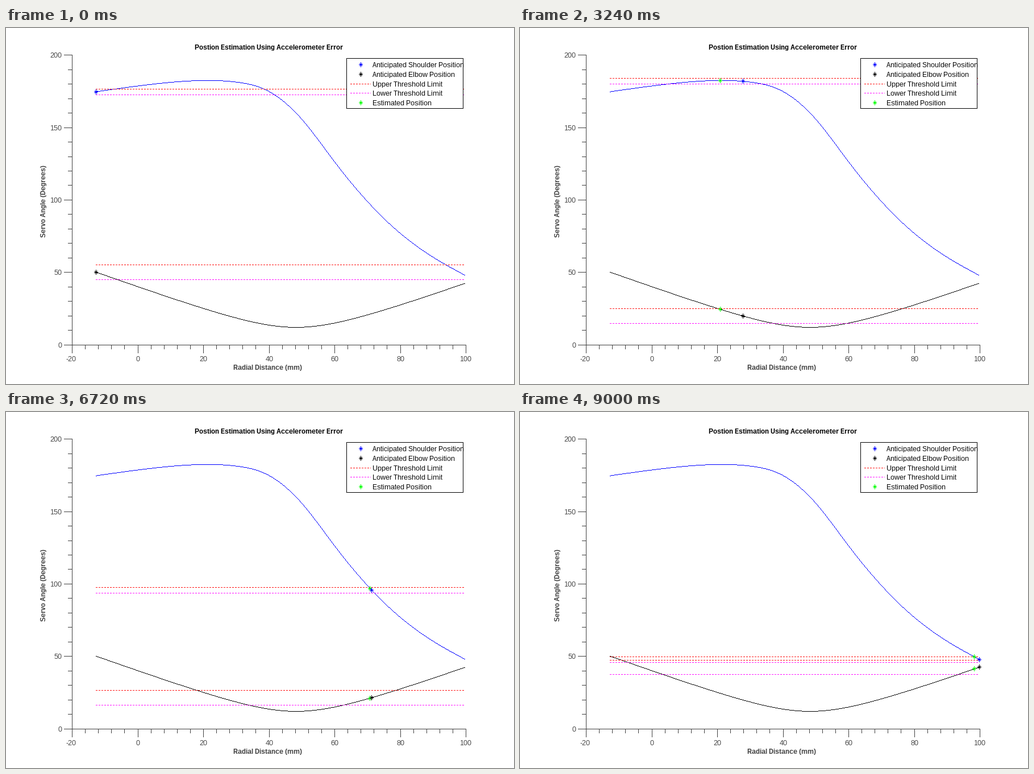
These frames come from a looping animation (894 px wide and 626 px high, 9.04 s). A matplotlib script:

```python
import matplotlib.pyplot as plt
import numpy as np
from matplotlib.animation import FuncAnimation
from matplotlib.patches import Rectangle

W, H, DPI = 894, 626, 100
PX = 72 / DPI
FRAMES, STEP_MS = 226, 40
SHOULDER_TOL, ELBOW_TOL = 2, 5
BLUE, BLACK, RED, PINK, GREEN = "#0000ff", "#000000", "#ff0000", "#ff00ff", "#00ff00"
AXIS = "#404040"

plt.rcParams.update({
    "font.family": "Liberation Sans", "font.size": 12 * PX,
    "text.hinting": "default", "text.hinting_factor": 1,
    "lines.scale_dashes": False, "path.simplify": False,
})


def spline(knots, x):
    """Natural cubic spline through the (x, y) knots."""
    kx, ky = np.array(knots, float).T
    n, h = len(kx), np.diff(kx)
    slope = np.diff(ky) / h
    a, b = np.eye(n), np.zeros(n)
    for i in range(1, n - 1):
        a[i, i - 1:i + 2] = h[i - 1], 2 * (h[i - 1] + h[i]), h[i]
        b[i] = 6 * (slope[i] - slope[i - 1])
    m = np.linalg.solve(a, b)
    k = np.clip(np.searchsorted(kx, x) - 1, 0, n - 2)
    t, u, d = x - kx[k], kx[k + 1] - x, h[k]
    return ((m[k] * u**3 + m[k + 1] * t**3) / (6 * d)
            + (ky[k] / d - m[k] * d / 6) * u
            + (ky[k + 1] / d - m[k + 1] * d / 6) * t)


def to_x(mm):
    return 116.5 + 5.775 * (mm + 20)


def to_y(deg):
    return 557.2 - 2.5475 * deg


radius = -12.7 + 0.5 * np.arange(FRAMES)
shoulder = spline([(-12.7, 174.7), (10, 181.2), (30, 181.4), (40, 174.9),
                   (50, 155.6), (60, 126.2), (75, 87.2), (88, 63.4),
                   (99.8, 47.9)], radius)
offset = radius - 48.2
elbow = 12.1 + np.hypot(14.4, 0.826 * offset) - 14.4 - 0.003 * offset

fig = plt.figure(figsize=(W / DPI, H / DPI), dpi=DPI, facecolor="white")
ax = fig.add_axes([0, 0, 1, 1])
ax.set_xlim(0, W)
ax.set_ylim(H, 0)
ax.axis("off")


def line(xs, ys, color, z=2, **kw):
    """Crisp one-pixel line; points belong on pixel centres."""
    return ax.plot(xs, ys, color=color, lw=0.5 * PX, antialiased=False,
                   snap=False, solid_capstyle="butt", dash_capstyle="butt",
                   zorder=z, **kw)[0]


def text(x, y, s, color=BLACK, **kw):
    kw.setdefault("va", "baseline")
    ax.text(x, y, s, color=color, zorder=12, **kw)


def pixels(x, y):
    """Path data that fills the single pixel under each point."""
    x, y = np.floor(x), np.floor(y) + 0.5
    gap = np.full(len(x), np.nan)
    return (np.column_stack([x + 0.1, x + 0.9, gap]).ravel(),
            np.column_stack([y, y, gap]).ravel())


def curve_pixels(x, y):
    """One pixel per step along the longer axis of travel."""
    step = np.maximum(abs(np.diff(x)), abs(np.diff(y)))
    dist = np.concatenate([[0], np.cumsum(step)])
    at = np.arange(0, dist[-1])
    return pixels(np.interp(at, dist, x), np.interp(at, dist, y))


def star_pixels(x, y):
    dx, dy = np.meshgrid(np.arange(-3, 4), np.arange(-4, 5))
    arms = (dx * dy == 0) | ((abs(dx) == abs(dy)) & (abs(dx) < 3))
    return pixels(np.floor(x) + dx[arms], np.floor(y) + dy[arms])


def star(color, z, x=0, y=0):
    return line(*star_pixels(x, y), color, z)


def dashed(color, z=3, x0=158, x1=806):
    return line([x0 + 0.1, x1], [0, 0], color, z,
                linestyle=(0, (2.8 * PX, 2.2 * PX)))


def level(ln, y):
    ln.set_ydata([np.floor(y) + 0.5] * 2)


# Axes and ticks
line([116.5, 116.5], [47, 558], AXIS)
line([116, 810], [557.5, 557.5], AXIS)
for deg in range(0, 201, 10):
    y = np.floor(to_y(deg)) + 0.5
    major = deg % 50 == 0
    line([102 if major else 109, 116], [y, y], AXIS)
    if major:
        text(98.5, y + 4.5, str(deg), AXIS, ha="right")
for mm in range(-20, 101, 4):
    x = np.floor(to_x(mm)) + 0.5
    major = mm % 20 == 0
    line([x, x], [558, 572 if major else 565], AXIS)
    if major:
        text(x - (2 if mm < 0 else 0), 586, str(mm), AXIS, ha="center")

text(462.5, 38, "Postion Estimation Using Accelerometer Error",
     ha="center", weight="bold")
text(461, 601, "Radial Distance (mm)", AXIS, ha="center", weight="bold")
text(67, 304.5, "Servo Angle (Degrees)", AXIS, ha="center", va="center",
     rotation=90, weight="bold")

# Legend
ax.add_patch(Rectangle((599, 53), 205, 88, fc="white", lw=0, zorder=10))
line([599, 804.5, 804.5, 599.5, 599.5], [53.5, 53.5, 141.5, 141.5, 53.5],
     BLACK, 11)
rows = [("Anticipated Shoulder Position", BLUE), ("Anticipated Elbow Position", BLACK),
        ("Upper Threshold Limit", RED), ("Lower Threshold Limit", PINK),
        ("Estimated Position", GREEN)]
for i, (label, color) in enumerate(rows):
    y = round(64 + 16.75 * i)
    if "Limit" in label:
        level(dashed(color, 11, 606, 642), y)
    else:
        star(color, 11, 624, y)
    text(645, y + 5, label)

# Curves and moving parts
tracks = []
for curve, tol, color in ((shoulder, SHOULDER_TOL, BLUE), (elbow, ELBOW_TOL, BLACK)):
    line(*curve_pixels(to_x(radius), to_y(curve)), color)
    tracks.append((curve, tol, dashed(RED), dashed(PINK), star(GREEN, 5), star(color, 6)))


def update(i):
    # The estimate is the first sample inside both threshold bands.
    inside = ((abs(shoulder - shoulder[i]) <= SHOULDER_TOL)
              & (abs(elbow - elbow[i]) <= ELBOW_TOL))
    guess = int(np.argmax(inside))
    for curve, tol, upper, lower, found, actual in tracks:
        level(upper, to_y(curve[i] + tol))
        level(lower, to_y(curve[i] - tol))
        found.set_data(*star_pixels(to_x(radius[guess]), to_y(curve[guess])))
        actual.set_data(*star_pixels(to_x(radius[i]), to_y(curve[i])))
    return []


anim = FuncAnimation(fig, update, frames=FRAMES, interval=STEP_MS,
                     init_func=lambda: update(0), repeat=True, repeat_delay=0)
plt.show()
```
